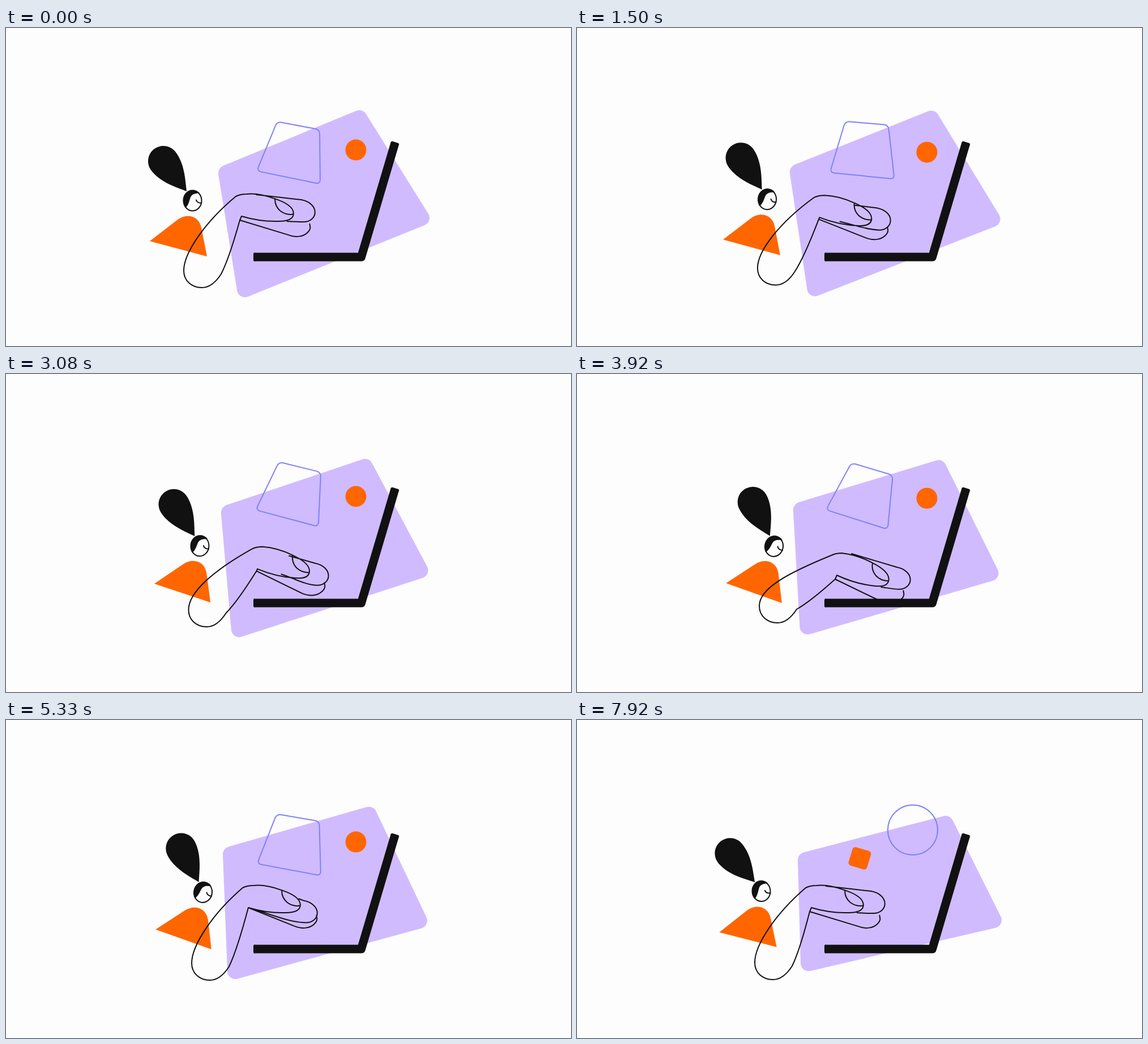
Write an HTML page that moves like this. It is 998 px wide and 561 px high and loops after 8 s.

```html
<!DOCTYPE html>
<html lang="en">
<head>
<meta charset="utf-8">
<title>Typing at a laptop</title>
<style>
html, body { margin: 0; width: 100%; height: 100%; overflow: hidden; background: #fdfdfd; }
svg { display: block; width: 100%; height: 100%; }
.ink { fill: #111; }
.line { fill: none; stroke: #111; stroke-width: 2; stroke-linecap: round; stroke-linejoin: round; }
.laptop { fill: none; stroke: #111; stroke-width: 15; stroke-linejoin: round; }
.laptop-end { fill: none; stroke: #111; stroke-width: 4; stroke-linecap: round; }
.orange { fill: #ff6600; }
#panel { fill: #d0bbff; stroke: #d0bbff; stroke-width: 28; stroke-linejoin: round; }
#outline { fill: none; stroke: #8080fa; stroke-width: 2; }
</style>
</head>
<body>
<svg viewBox="0 0 998 561">
  <path id="panel"/>
  <path id="outline"/>
  <rect id="dot" class="orange"/>
  <path class="laptop" d="M438 404H627.500L687.200 202.500"/>
  <path class="laptop-end" d="M439 398.500V409.500M682.500 202L692 204.800"/>
  <path id="body" class="orange" d="M-50.500 -13.500L-2.500 -50.500C15.500 -64.500 36.500 -57.500 40.500 -37.500L50.500 13.500Z"/>
  <g id="head">
    <path class="ink" transform="translate(-10.500 -16.500) rotate(-37.700)"
      d="M0 0C-10 -17 -27 -40 -27 -67C-27 -82 -15 -94 0 -94C15 -94 27 -82 27 -67C27 -40 10 -17 0 0Z"/>
    <ellipse class="line" rx="16" ry="18" style="fill:#fdfdfd"/>
    <path class="ink" d="M-12.500 13C-20 1 -16 -18.500 0 -18.500C6 -18.500 11 -16 12.500 -13C3 -13 -1 -11 -3.500 -6C-6 1 -7 8 -12.500 13Z"/>
    <path class="line" d="M6.500 -1C7 2 11 5 16 4"/>
  </g>
  <path id="arm" class="line"/>
</svg>
<script>
const LOOP = 8000, STEP = 1000 / 12;
const CHANGE = 5830, CHANGE_TIME = 520;

// head and body: x, y, tilt; fingers: near tilt, far tilt, curl
const start = {
  at: 0, head: [329.5, 304.5, 0], body: [304.5, 389.5, 0],
  elbow: [346, 458], wrist: [416, 332], fingers: [-3.5, -3.5, 0]
};
const raised = {
  at: 5330, head: [348, 304, 10], body: [313.5, 387, 4.6],
  elbow: [360, 459], wrist: [428, 331], fingers: [-3.5, -3.5, 1]
};
const settled = {
  ...start, at: CHANGE + CHANGE_TIME,
  head: [323.5, 301.5, 1], body: [302, 387.5, -0.7], wrist: [414, 331]
};
const poses = [
  start,
  { at: 750, head: [336, 302, 12.5], body: [306, 387.5, -2.3],
    elbow: [346, 453], wrist: [430, 338], fingers: [3, -4.5, 0] },
  { at: 2170, head: [336, 302.5, -3], body: [310.5, 386.5, 2.4],
    elbow: [355, 454], wrist: [427, 331], fingers: [0, 0, 1] },
  { at: 3920, head: [348, 304, 11], body: [312.5, 386.5, 4.5],
    elbow: [354, 439], wrist: [459, 355], fingers: [5, 3, 0] },
  raised,
  { ...raised, at: CHANGE },
  settled,
  { ...settled, at: 7920, head: [325.5, 302, -3] }
];

const clamp = u => Math.min(1, Math.max(0, u));
const sine = u => (1 - Math.cos(Math.PI * u)) / 2;
const back = u => 1 + 3.2 * (u - 1) ** 3 + 2.2 * (u - 1) ** 2;
const wave = (t, period) => Math.sin(2 * Math.PI * t / period);
const mix = (a, b, u) => a.map((v, i) => v + (b[i] - v) * u);
const move = ([x, y], dx, dy) => [x + dx, y + dy];

function poseAt(t) {
  const next = poses.findIndex(pose => pose.at > t);
  if (next < 0) return poses[poses.length - 1];
  const a = poses[next - 1], b = poses[next];
  const u = (a.at === CHANGE ? back : sine)((t - a.at) / (b.at - a.at));
  const pose = {};
  for (const part of ["head", "body", "elbow", "wrist", "fingers"]) pose[part] = mix(a[part], b[part], u);
  return pose;
}

// Maps hand coordinates to the stage, turned about the wrist.
function turnedAbout([x, y], degrees) {
  const a = degrees * Math.PI / 180, c = Math.cos(a), s = Math.sin(a);
  return (px, py) => [x + px * c - py * s, y + px * s + py * c];
}

function sleeve(elbow, wrist, cuff) {
  const right = move(elbow, 34, -24), left = move(elbow, -32, -30);
  const top = move(wrist, 9, -39), bend = move(top, -19, 4);
  const reach = [bend[0] - left[0], bend[1] - left[1]];
  return `M${wrist}L${cuff}
    C${move(mix(cuff, right, 0.35), 2, 1)} ${move(mix(cuff, right, 0.75), 3, 2)} ${right}
    C${move(right, -9, 14)} ${move(elbow, 14, 0)} ${elbow}
    C${move(elbow, -18, 0)} ${move(left, 0, 18)} ${left}
    C${move(left, 0, -31)} ${move(bend, -0.6 * reach[0], -0.35 * reach[1])} ${bend}
    C${move(bend, 6, -3)} ${move(top, -7, 0)} ${top}`;
}

function nearFinger(p, wrist) {
  return `C${p(26, -39)} ${p(45, -34)} ${p(61, -27)}
    C${p(81, -19)} ${p(92, -10)} ${p(92, 0)}
    C${p(92, 9)} ${p(84, 13)} ${p(71, 13)}
    C${p(43, 13)} ${p(19, 7)} ${wrist}
    M${p(61, -27)}C${p(60, -19)} ${p(62, -12)} ${p(69, -5)}
    C${p(75, 0)} ${p(82, 3)} ${p(91, 2)}`;
}

function middleFinger(from, tip, to) {
  const upper = move(tip, -24, -22), lower = move(tip, -20, 17);
  return `M${from}C${mix(from, upper, 0.33)} ${mix(from, upper, 0.67)} ${upper}
    C${move(tip, -9, -19)} ${move(tip, 0, -10)} ${tip}
    C${move(tip, 0, 10)} ${move(tip, -9, 17)} ${lower}
    C${lower[0] + 0.3 * (to[0] - lower[0])},${lower[1]} ${mix(lower, to, 0.7)} ${to}`;
}

function lowerFinger(from, tip) {
  const under = move(tip, -40, 13);
  return `M${from}L${under}C${move(under, 8, 3)} ${move(under, 14, 4)} ${move(tip, -20, 16)}
    C${move(tip, -8, 15)} ${move(tip, 0, 6)} ${tip}L${move(tip, -1, -6)}`;
}

function arm({ elbow, wrist, fingers: [nearTilt, farTilt, curl] }) {
  const near = turnedAbout(wrist, nearTilt), far = turnedAbout(wrist, farTilt);
  const cuff = move(wrist, -3 * (1 - curl), 7 * (1 - curl));
  const from = mix(move(wrist, 26, -38), near(90, -10), curl);
  const to = mix(near(80, 14), wrist, curl);
  return sleeve(elbow, wrist, cuff) + nearFinger(near, wrist)
    + middleFinger(from, far(130 - 9 * curl, 1 + 16 * curl), to)
    + lowerFinger(cuff, far(120, 27));
}

function roundedQuad(p, radius) {
  const corner = i => [p[i % 4 * 2], p[i % 4 * 2 + 1]];
  const toward = (a, b) => mix(a, b, radius / Math.hypot(b[0] - a[0], b[1] - a[1]));
  let d = "";
  for (let i = 0; i < 4; i++) {
    const c = corner(i), enter = toward(c, corner(i + 3)), leave = toward(c, corner(i + 1));
    d += `${i ? "L" : "M"}${enter}C${mix(enter, c, 0.5523)} ${mix(leave, c, 0.5523)} ${leave}`;
  }
  return d + "Z";
}

const panelShapes = [
  [389, 256, 624, 159, 734, 335, 422, 461],
  [397, 237, 641, 167, 730, 354, 405, 443],
  [404, 247, 651, 183, 736, 353, 409, 429]
];
const trapezoid = [-29, -53, 46, -39, 47, 57, -65, 34];
const square = [-44, -44, 44, -44, 44, 44, -44, 44];

const set = (id, attrs) => {
  for (const name in attrs) document.getElementById(id).setAttribute(name, attrs[name]);
};
const place = ([x, y, tilt]) => ({ transform: `translate(${x} ${y}) rotate(${tilt})` });

function draw(t) {
  const pose = poseAt(t);
  set("head", place(pose.head));
  set("body", place(pose.body));
  set("arm", { d: arm(pose) });

  const change = back(clamp((t - CHANGE) / CHANGE_TIME));
  const lean = sine(clamp((t - 600) / 4400));
  set("panel", { d: `M${mix(mix(panelShapes[0], panelShapes[1], lean), panelShapes[2], change)}Z` });

  const floating = [508, 214 + 4.5 * wave(t + 1000, 5200), -6 * wave(t, 5200)];
  set("outline", {
    d: roundedQuad(mix(trapezoid, square, change), Math.min(44, 7 + 37 * change)),
    ...place(mix(floating, [593, 194, 0], change))
  });

  const bobbing = [618, 217.5 - 2.5 * wave(t + 224, 1066), 0];
  const resting = [499.5, 244, 8 + 9 * clamp((t - 6420) / 1500)];
  const size = 37 - 3 * change;
  set("dot", {
    x: -size / 2, y: -size / 2, width: size, height: size, rx: 18.5 - 13 * change,
    ...place(mix(bobbing, resting, change))
  });
}

const began = performance.now();
function tick() {
  const t = (performance.now() - began) % LOOP;
  draw(Math.floor(t / STEP + 0.1) * STEP);
  requestAnimationFrame(tick);
}
tick();
</script>
</body>
</html>
```
